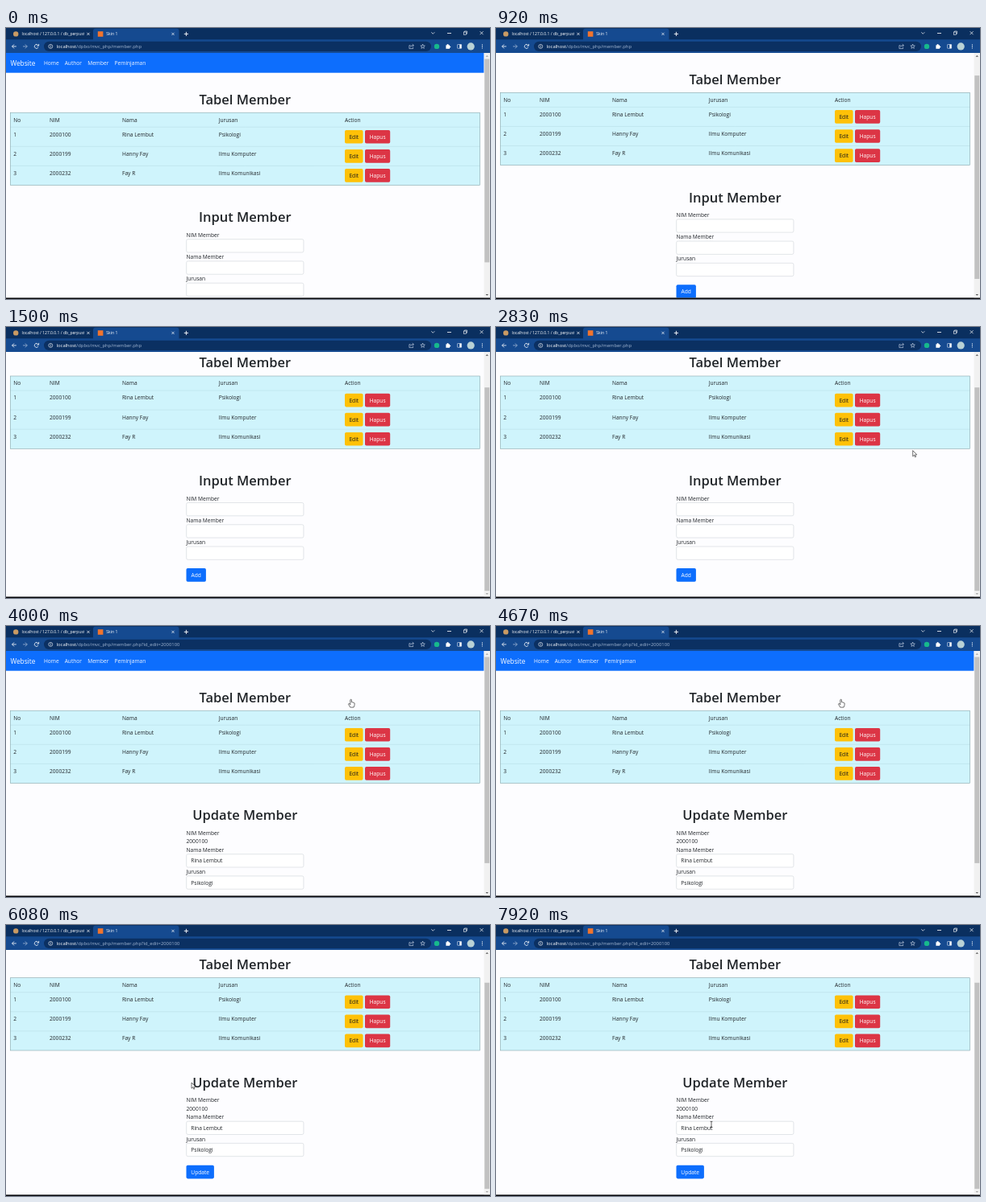
Write an HTML page with a canvas that moves like this. It is 600x337 px and loops after 8 s.

```html
<!DOCTYPE html>
<html lang="id">
<head>
<meta charset="utf-8">
<title>Tabel Member</title>
<style>
html, body { margin: 0; width: 100%; height: 100%; overflow: hidden; background: #fdfdff; }
canvas { display: block; width: 600px; height: 337px; }
</style>
</head>
<body>
<canvas id="stage"></canvas>
<script>
const W = 600, H = 337, LOOP = 8000, STEP = 1000 / 12;
const canvas = document.getElementById('stage');
const ctx = canvas.getContext('2d');
const dpr = window.devicePixelRatio || 1;
canvas.width = W * dpr;
canvas.height = H * dpr;

const FONT = '"Open Sans", "Noto Sans", sans-serif';
const INK = '#212529', STRIP = '#0a2f5f', TOOLBAR = '#154a90', PILL = '#0b3062';
const BLUE = '#0d6efd', YELLOW = '#ffc107', RED = '#dc3545';
const VIEW_TOP = 31, VIEW_BOTTOM = 335.6;
const COLS = [9.3, 54, 144, 263.7, 420];
const ROWS = [
  ['1', '2000100', 'Rina Lembut', 'Psikologi'],
  ['2', '2000199', 'Hanny Fay', 'Ilmu Komputer'],
  ['3', '2000232', 'Fay R', 'Ilmu Komunikasi']
];
const SWITCH_AT = 3750;
const SCROLL_MAX = { input: 44.2, update: 39.5 };

// Pointer stops: time, x, y
const PATH = [
  [2660, 548, 186], [2833, 516.7, 153.6], [3333, 427.6, 91.3], [4950, 427.6, 91.3],
  [5800, 230, 196], [6420, 230, 196], [7250, 266, 200], [7420, 266, 200], [7900, 267, 248]
];

const clamp = v => Math.max(0, Math.min(1, v));
const smooth = v => { v = clamp(v); return v * v * (3 - 2 * v); };

function rect(x, y, w, h, fill) {
  ctx.fillStyle = fill;
  ctx.fillRect(x, y, w, h);
}

function round(x, y, w, h, r, fill, stroke) {
  ctx.beginPath();
  ctx.roundRect(x, y, w, h, r);
  if (fill) { ctx.fillStyle = fill; ctx.fill(); }
  if (stroke) { ctx.strokeStyle = stroke; ctx.lineWidth = 0.5; ctx.stroke(); }
}

function disc(x, y, r, fill) {
  ctx.beginPath();
  ctx.arc(x, y, r, 0, 7);
  ctx.fillStyle = fill;
  ctx.fill();
}

function line(points, color, width = 0.7) {
  ctx.beginPath();
  points.forEach(([x, y], i) => i ? ctx.lineTo(x, y) : ctx.moveTo(x, y));
  ctx.strokeStyle = color;
  ctx.lineWidth = width;
  ctx.stroke();
}

// mid is the vertical centre of the capitals
function text(str, x, mid, size = 6.65, color = INK, weight = 400, align = 'left') {
  ctx.font = `${weight} ${size}px ${FONT}`;
  ctx.textAlign = align;
  ctx.fillStyle = color;
  ctx.fillText(str, x, mid + size * 0.357);
}

function button(label, x, y, w, fill, color) {
  round(x, y, w, 16.7, 1.8, fill);
  text(label, x + w / 2, y + 8.5, 6.65, color, 400, 'center');
}

function field(y, value) {
  round(223.7, y, 145.2, 16.3, 1.8, '#fff', '#c4cad1');
  if (value) text(value, 229.3, y + 8.4);
}

function cross(x, y, r, color) {
  line([[x - r, y - r], [x + r, y + r]], color);
  line([[x + r, y - r], [x - r, y + r]], color);
}

function drawTabs() {
  rect(0, 0, W, 15, STRIP);
  round(108, 0.8, 106.5, 16, 3, TOOLBAR);
  disc(12.2, 7.4, 3.2, '#c99a63');
  ctx.save();
  ctx.beginPath();
  ctx.rect(0, 0, 97, 15);
  ctx.clip();
  text('localhost / 127.0.0.1 / db_perpustakaan', 19.5, 7.4, 5.05, '#fff');
  ctx.restore();
  cross(102, 7.4, 1.6, '#fff');
  rect(113.8, 4.2, 6.6, 6.6, '#f0742e');
  text('Skin 1', 124.3, 7.4, 5.05, '#fff');
  cross(207, 7.4, 1.6, '#fff');
  line([[220.8, 7.4], [226, 7.4]], '#fff', 0.9);
  line([[223.4, 4.8], [223.4, 10]], '#fff', 0.9);
  line([[527.3, 5.3], [529.3, 7.3], [531.3, 5.3]], '#fff');
  line([[547, 6.5], [552, 6.5]], '#fff', 0.8);
  ctx.strokeStyle = '#fff';
  ctx.lineWidth = 0.6;
  ctx.strokeRect(567.3, 5, 3.2, 3.2);
  line([[568.4, 4.9], [568.4, 4], [571.6, 4], [571.6, 7.2], [570.7, 7.2]], '#fff', 0.6);
  cross(589.6, 6.2, 2, '#fff');
}

function drawToolbar(query) {
  rect(0, 14.3, W, 16.7, TOOLBAR);
  line([[12.8, 22.9], [7.6, 22.9]], '#fff', 0.8);
  line([[10, 20.4], [7.5, 22.9], [10, 25.4]], '#fff', 0.8);
  line([[21, 22.9], [26.2, 22.9]], '#9db4d3', 0.8);
  line([[23.8, 20.4], [26.3, 22.9], [23.8, 25.4]], '#9db4d3', 0.8);
  ctx.beginPath();
  ctx.arc(37.8, 22.9, 2.5, 0.5, 5.6);
  ctx.strokeStyle = '#fff';
  ctx.lineWidth = 0.8;
  ctx.stroke();
  line([[40.6, 19.9], [40.6, 22.2], [38.3, 22.2]], '#fff', 0.8);

  round(47, 16.7, 480, 12.4, 6.2, PILL);
  ctx.beginPath();
  ctx.arc(55.3, 22.9, 2.5, 0, 7);
  ctx.lineWidth = 0.6;
  ctx.stroke();
  line([[55.3, 22.5], [55.3, 24.3]], '#fff');
  line([[55.3, 21.3], [55.3, 22]], '#fff');
  text('localhost', 62.6, 22.8, 5.85, '#fff');
  const host = ctx.measureText('localhost').width;
  text('/dpbo/mvc_php/member.php' + query, 62.6 + host, 22.8, 5.85, '#a3b7d3');

  const pale = '#dbe5f3';
  line([[501.5, 21.6], [499.9, 21.6], [499.9, 25.6], [504.6, 25.6], [504.6, 24]], pale, 0.6);
  line([[501.5, 23.8], [502.4, 22], [505, 21.7]], pale, 0.6);
  line([[503.8, 20], [505.6, 21.7], [503.8, 23.3]], pale, 0.6);
  const star = [];
  for (let i = 0; i <= 10; i++) {
    const r = i % 2 ? 1.25 : 2.9, a = i * Math.PI / 5;
    star.push([516.6 + r * Math.sin(a), 23 - r * Math.cos(a)]);
  }
  line(star, pale, 0.6);
  disc(534, 22.9, 3.2, '#17b98c');
  rect(545.4, 21.3, 4.6, 4.5, '#fff');
  disc(547.6, 21.1, 1.1, '#fff');
  disc(550.2, 23.5, 1.1, '#fff');
  round(559.6, 20.5, 5, 4.8, 0.4, null, '#fff');
  rect(562.3, 20.5, 2.3, 4.8, '#fff');
  disc(576.2, 22.9, 4.6, '#b9d2d6');
  for (const y of [20.8, 22.9, 25]) disc(590.4, y, 0.6, '#fff');
}

function drawTable() {
  rect(5.3, 105.2, 582.2, 90.3, '#cff4fc');
  text('No', COLS[0], 114.3);
  ['NIM', 'Nama', 'Jurusan', 'Action'].forEach((s, i) => text(s, COLS[i + 1], 114.3));
  ROWS.forEach((row, i) => {
    const y = 123.2 + i * 24.1;
    line([[5.3, y], [587.5, y]], '#b3d9e1', 0.5);
    row.forEach((s, c) => text(s, COLS[c], y + 9.1));
    button('Edit', 420, y + 3.7, 22.6, YELLOW, '#1c1c1c');
    button('Hapus', 445, y + 3.7, 31.2, RED, '#fff');
  });
  ctx.strokeStyle = '#86a5ab';
  ctx.lineWidth = 0.6;
  ctx.strokeRect(5.3, 105.2, 582.2, 90.3);
}

function title(str, mid) {
  text(str, 296.3, mid, 16.5, INK, 600, 'center');
}

function drawPage(mode, scroll) {
  ctx.save();
  ctx.beginPath();
  ctx.rect(0, VIEW_TOP, W, VIEW_BOTTOM - VIEW_TOP);
  ctx.clip();
  rect(0, VIEW_TOP, W, H, '#fdfdff');
  ctx.translate(0, -scroll);

  rect(0, 31, 592.6, 24.7, BLUE);
  text('Website', 5.4, 43.9, 8.3, '#fff');
  [['Home', 47], ['Author', 72.7], ['Member', 101.2], ['Peminjaman', 134.6]]
    .forEach(([s, x]) => text(s, x, 43.9, 6.6, '#f1f6ff'));

  title('Tabel Member', 88.8);
  drawTable();

  if (mode === 'input') {
    title('Input Member', 235.6);
    ['NIM Member', 'Nama Member', 'Jurusan'].forEach((s, i) => {
      const y = 257.4 + i * 27.25;
      text(s, 223.5, y);
      field(y + 5.3);
    });
    button('Add', 223.5, 344.2, 24.4, BLUE, '#fff');
  } else {
    title('Update Member', 235.6);
    text('NIM Member', 223.5, 257.4);
    text(ROWS[0][1], 223.5, 267.9);
    text('Nama Member', 223.5, 278.5);
    field(283.7, ROWS[0][2]);
    text('Jurusan', 223.5, 305.8);
    field(310.9, ROWS[0][3]);
    button('Update', 223.5, 338.2, 34.4, BLUE, '#fff');
  }
  ctx.restore();
}

function drawScrollbar(max, scroll) {
  const view = VIEW_BOTTOM - VIEW_TOP, top = 38.5, track = 289.6;
  const k = track / (view + max);
  rect(592.6, VIEW_TOP, 7.4, view, '#f1f1f1');
  rect(593.3, top + scroll * k, 6, view * k, '#c1c1c1');
  const arrow = (y, dir, color) => {
    ctx.beginPath();
    ctx.moveTo(594.6, y + dir);
    ctx.lineTo(596.3, y - dir);
    ctx.lineTo(598, y + dir);
    ctx.fillStyle = color;
    ctx.fill();
  };
  arrow(34.9, 0.9, scroll > 0 ? '#505050' : '#a3a3a3');
  arrow(331.8, -0.9, scroll < max ? '#505050' : '#a3a3a3');
}

function shape(points, fill) {
  ctx.beginPath();
  points.forEach(([x, y]) => ctx.lineTo(x, y));
  ctx.closePath();
  ctx.fillStyle = fill;
  ctx.fill();
  ctx.strokeStyle = '#111';
  ctx.lineWidth = 0.6;
  ctx.stroke();
}

const pointers = {
  arrow() {
    shape([[0, 0], [0, 7.2], [1.7, 5.7], [2.8, 8.2], [3.9, 7.7], [2.8, 5.3], [5, 5.2]], '#fff');
  },
  hand() {
    shape([[-0.8, 0.4], [0, 0], [0.8, 0.4], [0.8, 3.4], [2.2, 3.6], [3.6, 4], [4.5, 4.7],
      [4.4, 7.2], [3.5, 9.8], [-0.9, 9.8], [-2, 7.8], [-3.2, 5.8], [-2.5, 5], [-0.8, 6.4]], '#fff');
  },
  beam() {
    line([[0, -3.4], [0, 3.4]], '#222');
    line([[-1.4, -3.6], [1.4, -3.6]], '#222');
    line([[-1.4, 3.6], [1.4, 3.6]], '#222');
  }
};

function drawPointer(t, scroll) {
  if (t < PATH[0][0]) return;
  let i = 0;
  while (i < PATH.length - 2 && t >= PATH[i + 1][0]) i++;
  const [t0, x0, y0] = PATH[i], [t1, x1, y1] = PATH[i + 1];
  const k = smooth((t - t0) / (t1 - t0));
  const x = x0 + (x1 - x0) * k, y = y0 + (y1 - y0) * k, py = y + scroll;
  const overEdit = x >= 420 && x <= 442.6;
  const overText = t > SWITCH_AT && x > 231 && x < 361 &&
    (Math.abs(py - 235.6) < 11 || (py > 283.7 && py < 300));
  ctx.save();
  ctx.translate(x, y);
  pointers[overEdit ? 'hand' : overText ? 'beam' : 'arrow']();
  ctx.restore();
}

function draw(time) {
  const t = Math.floor((time + 4) / STEP) * STEP;
  const mode = t < SWITCH_AT ? 'input' : 'update';
  const max = SCROLL_MAX[mode];
  const scroll = max * (mode === 'input' ? smooth((t - 830) / 160) : smooth((t - 4750) / 200));

  ctx.setTransform(dpr, 0, 0, dpr, 0, 0);
  drawPage(mode, scroll);
  drawScrollbar(max, scroll);
  drawTabs();
  drawToolbar(mode === 'input' ? '' : '?id_edit=2000100');
  rect(0, VIEW_BOTTOM, W, H - VIEW_BOTTOM, '#05070a');
  drawPointer(t, scroll);
}

const start = performance.now();
function tick() {
  draw((performance.now() - start) % LOOP);
  requestAnimationFrame(tick);
}
tick();
</script>
</body>
</html>
```
